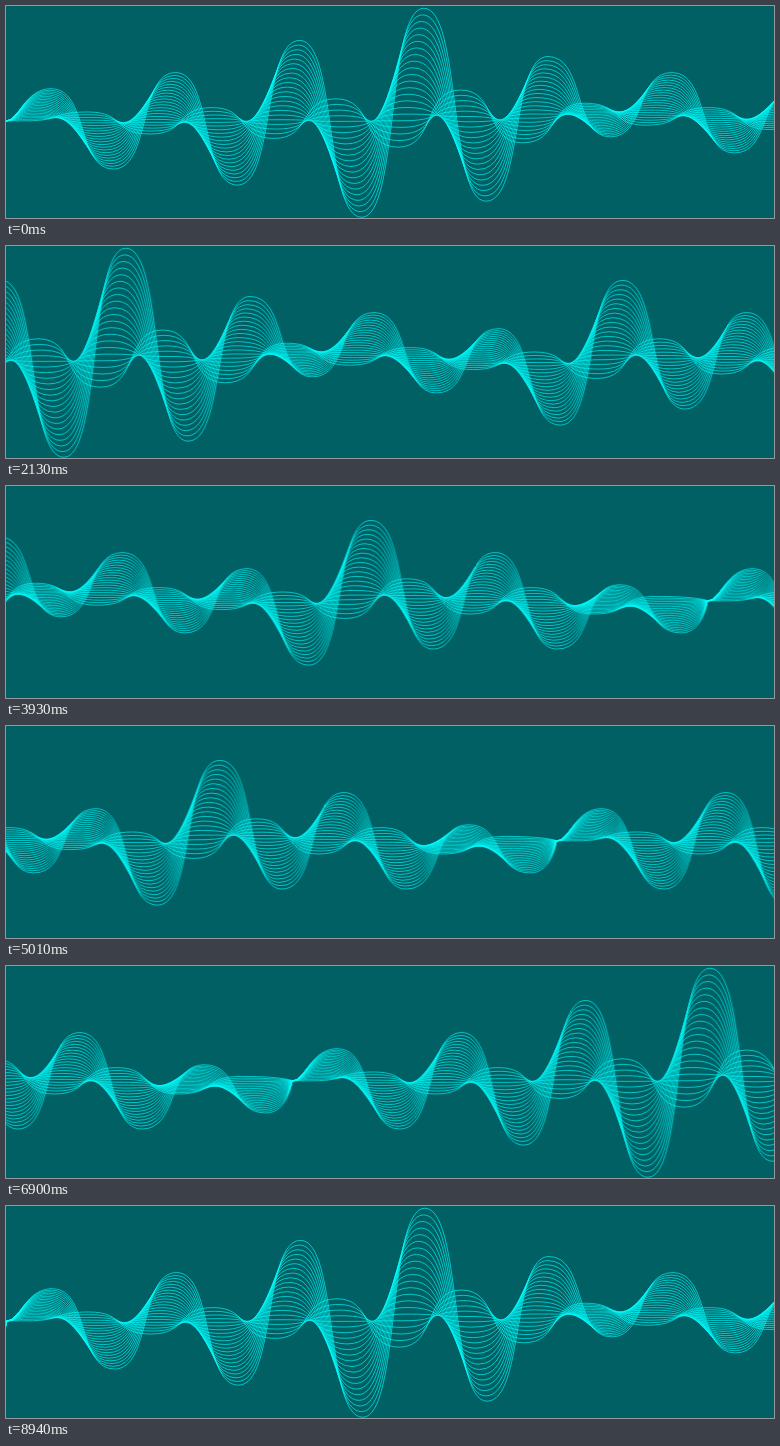
Recreate the animation shown at these times as an HTML page. Size 768 by 212 pixels, loop 8.97 s.

```html
<!DOCTYPE html>
<html lang="en">
<head>
<meta charset="utf-8">
<title>Wave ribbon</title>
<style>
  html, body { margin: 0; width: 100%; height: 100%; overflow: hidden; background: #006064; }
  svg { display: block; width: 768px; height: 212px; overflow: hidden; }
  #ribbon { animation: scroll 8970ms steps(299, end) infinite; }
  #ribbon path { fill: none; stroke: #00ffff; stroke-width: .65; }
  @keyframes scroll { to { transform: translateX(-1254.2px); } }
</style>
</head>
<body>
<svg viewBox="0 0 768 212"><g id="ribbon"></g></svg>
<script>
const PERIOD = 1251, BASE = 114.8, LINES = 22;
const EASE = 0.6, END_EASE = 0.85;
const STEP = 62.07, FIRST = 45.4, LEAD = 25.5;
const TALL = 16.08, LOW = 4.4;

// Signed crest heights, in units, of the tall outer wave
const crests = [2, -3, 3, -4, 5, -6, 7, -5, 4, -1, 3, -2, 2, -4, 5, -3, 3, -3, 1, -2];

const mix = (a, b, s) => a + (b - a) * s;
const fix = (...nums) => nums.map(n => n.toFixed(2)).join(' ');

// Each line blends the tall wave (s = 0) into the low, inverted one (s = 1)
function wavePath(s, left) {
  let x = left, y = BASE, d = 'M' + fix(x, y);
  crests.forEach((c, i) => {
    const nx = left + FIRST + STEP * i - LEAD * s;
    const ny = BASE - mix(c * TALL, (crests[i - 1] || 0) * LOW, s);
    const h = (nx - x) * EASE;
    d += 'C' + fix(x + (i ? h : h / 2), y, nx - h, ny, nx, ny);
    x = nx;
    y = ny;
  });
  const end = left + PERIOD;
  return d + 'C' + fix(mix(x, end, END_EASE), y, end, BASE, end, BASE);
}

const ribbon = document.getElementById('ribbon');
for (let i = 0; i < LINES; i++) {
  const s = i / (LINES - 1);
  const path = document.createElementNS('http://www.w3.org/2000/svg', 'path');
  path.setAttribute('d', wavePath(s, 0) + wavePath(s, PERIOD));
  ribbon.append(path);
}
</script>
</body>
</html>
```
